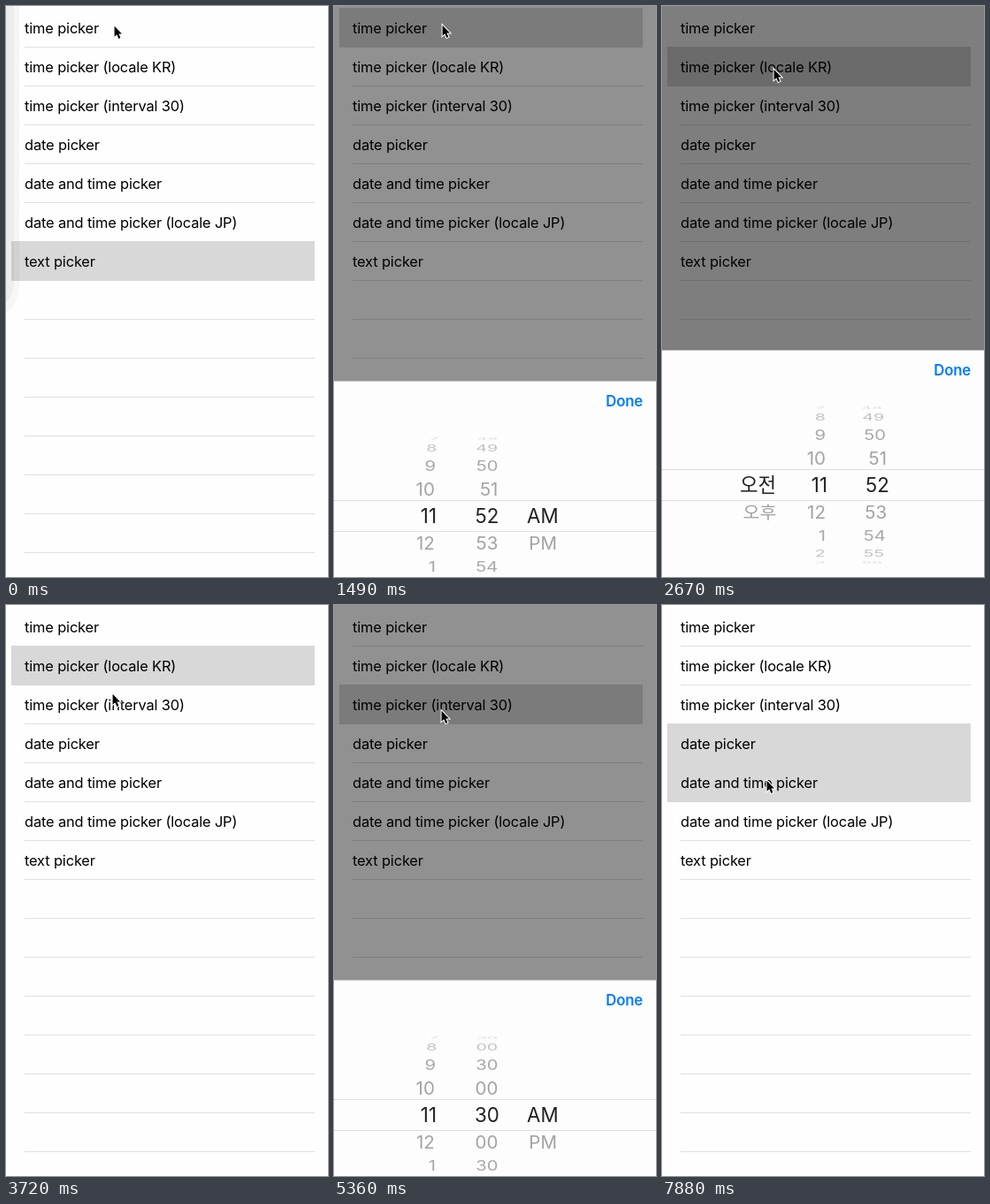
Animation, 364 px wide and 646 px high, one loop 8 s. Source, as an HTML page:

```html
<!DOCTYPE html>
<html lang="en">
<head>
<meta charset="utf-8">
<title>Picker list</title>
<style>
  html, body { margin: 0; width: 100%; height: 100%; overflow: hidden; background: #fefefe; }
  svg { display: block; font-family: Inter, "Noto Sans CJK KR", "Noto Sans CJK", sans-serif; }
  .row { font-size: 16.4px; letter-spacing: -.14px; }
  .line { fill: #dfdfe1; }
  .done { font-size: 16.8px; font-weight: 600; letter-spacing: -.2px; fill: #007aff; text-anchor: end; }
  .picked { font-size: 22.4px; fill: #222; }
  .rest { font-size: 20.7px; }
</style>
</head>
<body>
<svg width="364" height="646" viewBox="0 0 364 646">
  <rect width="364" height="646" fill="#fefefe"/>
  <g id="lines"></g>
  <g id="marks"></g>
  <g id="labels"></g>
  <g id="shade">
    <rect x="-80" y="-60" width="95" height="417" rx="40" fill-opacity=".03"/>
    <rect x="-80" y="-60" width="89" height="409" rx="36" fill-opacity=".035"/>
  </g>
  <rect id="dim" width="364" height="646"/>
  <g id="sheet">
    <rect y="-.5" width="364" height="259" fill="#fdfdfd"/>
    <text class="done" x="349" y="27.7">Done</text>
    <rect class="line" y="134" width="364" height="1"/>
    <rect class="line" y="169" width="364" height="1"/>
    <g id="wheels"></g>
  </g>
  <path id="cursor" d="M.6 .8V12.8L3.3 10.3L5.4 15L7.4 14.1L5.4 9.5H9Z" stroke="#fff" stroke-width="2" paint-order="stroke"/>
</svg>
<script>
const LOOP = 8000, TICK = 148.8, FIRST_TICK = 140, SLIDE = 300;
const SHEET_TOP = 390, SHEET_HEIGHT = 256, ROW = 44;
const $ = id => document.getElementById(id);

const titles = ['time picker', 'time picker (locale KR)', 'time picker (interval 30)', 'date picker',
  'date and time picker', 'date and time picker (locale JP)', 'text picker'];
const months = ['January', 'February', 'March', 'April', 'May', 'June', 'July', 'August',
  'September', 'October', 'November', 'December'];

// Each value function takes the distance from the picked row.
const hour = n => (n + 22) % 12 + 1;
const minute = n => 52 + n;
const halfHour = n => n % 2 ? '00' : '30';
const column = (anchor, picked, rest, value) => ({ anchor, picked, rest, value });
const hourColumn = column('end', 116, 113.5, hour);
const meridiem = column('start', 218, 220.5, n => ['AM', 'PM'][n]);

const pickers = [
  [hourColumn, column('end', 186.5, 185.5, minute), meridiem],
  [column('start', 88, 91, n => ['오전', '오후'][n]), column('end', 187, 185, hour), column('end', 257, 254.5, minute)],
  [hourColumn, column('end', 187, 185.5, halfHour), meridiem],
  [column('start', 41, 48.3, n => months[(n + 12) % 12]), column('end', 212, 209, n => 5 + n),
    column('start', 249, 251, n => 2017 + n)]
];

const visits = [
  { row: 0, press: 135, open: 430, close: 1401 },
  { row: 1, press: 2060, open: 2240, close: 3336 },
  { row: 2, press: 4000, open: 4140, close: 5270 },
  { row: 3, press: 5940, open: 6085, close: 7204 },
  { row: 4, press: 7870, open: 9000, close: 9900 }
];

const path = [[0, 122, 22], [400, 122, 21], [1550, 122, 21], [1900, 126, 71], [3450, 126, 71],
  [3711, 120, 100], [3860, 121, 119], [5400, 121, 119], [5780, 120, 160], [7290, 120, 160], [7570, 118, 198]];

const clamp = x => Math.min(1, Math.max(0, x));
const ease = x => x < .5 ? 2 * x * x : 1 - 2 * (1 - x) ** 2;

function wheelItem({ anchor, picked, rest, value }, n) {
  const text = value(n);
  if (text === undefined) return '';
  if (!n) return `<text class="picked" text-anchor="${anchor}" x="${picked}" y="160.4">${text}</text>`;
  const angle = n * Math.PI / 9, depth = Math.cos(angle);
  const y = 152.3 + 89 * Math.sin(angle), scale = 1 - .09 * (1 - depth);
  const alpha = [0, .36, .34, .24, .12][Math.abs(n)];
  return `<text class="rest" text-anchor="${anchor}" fill-opacity="${alpha}" x="${rest - 182}" y="7.6"
    transform="translate(182 ${y}) scale(${scale} ${depth})">${text}</text>`;
}

const wheels = pickers.map(columns => {
  let out = '';
  for (const c of columns) for (let n = -4; n <= 4; n++) out += wheelItem(c, n);
  return `<g>${out}</g>`;
});

$('lines').innerHTML = Array.from({ length: 14 }, (_, i) =>
  `<rect class="line" x="21" y="${46 + ROW * i}" width="328" height="1"/>`).join('');
$('marks').innerHTML = titles.map((_, i) =>
  `<rect x="6" y="${2 + ROW * i}" width="343" height="${ROW + 1}" fill="#d8d8d8"/>`).join('');
$('labels').innerHTML = titles.map((title, i) =>
  `<text class="row" x="21" y="${30.5 + ROW * i}">${title}</text>`).join('');
$('wheels').innerHTML = wheels.join('');

function cursorAt(t) {
  const next = path.findIndex(p => p[0] > t);
  if (next < 0) return path[path.length - 1].slice(1);
  if (!next) return path[0].slice(1);
  const [t0, x0, y0] = path[next - 1], [t1, x1, y1] = path[next];
  const k = ease((t - t0) / (t1 - t0));
  return [x0 + (x1 - x0) * k, y0 + (y1 - y0) * k].map(Math.round);
}

function render(t) {
  const released = v => t >= v.open - 30;
  const last = visits.filter(released).pop();
  const selected = last ? last.row : 6;
  const pressed = visits.find(v => t >= v.press && !released(v));
  [...$('marks').children].forEach((mark, i) => {
    const on = i === selected || (pressed && i === pressed.row);
    mark.style.display = on ? '' : 'none';
  });

  const shown = last ? ease(clamp((t - last.open) / SLIDE)) - ease(clamp((t - last.close) / SLIDE)) : 0;
  $('dim').style.opacity = shown / 2;
  $('sheet').style.display = shown ? '' : 'none';
  $('sheet').setAttribute('transform', `translate(0 ${SHEET_TOP + Math.round(SHEET_HEIGHT * (1 - shown))})`);
  [...$('wheels').children].forEach((g, i) => g.style.display = i === selected ? '' : 'none');

  $('shade').style.display = t < 0 ? '' : 'none';
  $('cursor').setAttribute('transform', `translate(${cursorAt(t)})`);
}

// The picture advances in even ticks, like a screen recording.
function frame() {
  const t = performance.now() % LOOP;
  render(FIRST_TICK + TICK * Math.floor((t - FIRST_TICK) / TICK));
  requestAnimationFrame(frame);
}
frame();
</script>
</body>
</html>
```
